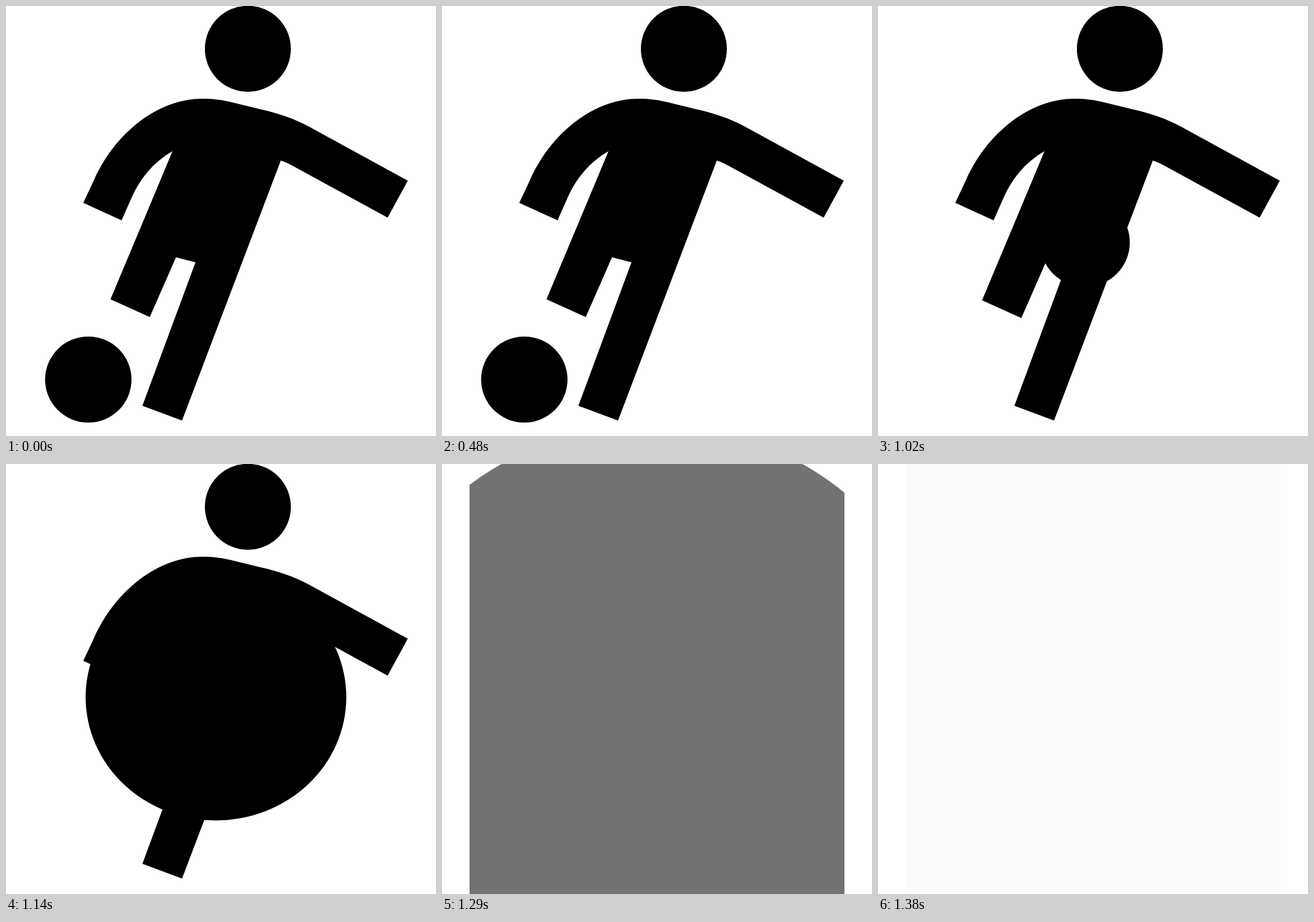
These frames come from a looping animation (640 by 640 pixels, 1830 ms). An HTML page with a canvas:

```html
<!DOCTYPE html>
<html lang="en">
<head>
<meta charset="utf-8">
<title>Kick</title>
<style>
  html, body { margin: 0; width: 100%; height: 100%; overflow: hidden; background: #fff; }
  canvas { display: block; width: 640px; height: 640px; }
</style>
</head>
<body>
<canvas id="stage" width="640" height="640"></canvas>
<script>
const ctx = document.getElementById('stage').getContext('2d');
const LOOP = 1830, STEP = 30, END = 1380;

const body = new Path2D(`
  M115 293 L131 259 C163 187 228 138 292 138 C310 138 322 140 335 143
  L380 154 C403 159 430 168 450 179 L598 260 L568 315
  L425 237 C420 234 415 232 409 230 L262 617 L203 595 L282 381.5 L253 374
  L190 356 L248 216 C220 232 200 256 188 283 L172 319 Z`);

const mix = (a, b, k) => a + (b - a) * k;

// Ease in and out between two times
function ease(t, from, to) {
  const u = Math.min(1, Math.max(0, (t - from) / (to - from)));
  return u * u * (3 - 2 * u);
}

function oval(x, y, rx, ry) {
  ctx.beginPath();
  ctx.ellipse(x, y, rx, ry, 0, 0, Math.PI * 2);
  ctx.fill();
}

function drawPlayer(t) {
  ctx.fillStyle = '#000';
  oval(360, 63.7, 64, 64);
  ctx.fill(body);

  // The kicking leg slides out along its own axis and back
  const reach = 70 * (ease(t, 550, 691) - ease(t, 691, 1053));
  const dx = -0.39 * reach, dy = 0.92 * reach;
  ctx.beginPath();
  ctx.moveTo(248, 216);
  ctx.lineTo(253, 374);
  ctx.lineTo(214, 463);
  ctx.lineTo(214 + dx, 463 + dy);
  ctx.lineTo(155.5 + dx, 436.5 + dy);
  ctx.closePath();
  ctx.fill();
}

function drawBall(t) {
  const fly = ease(t, 691, 1053);
  const grow = ease(t, 1003.5, 1378.5);
  const tone = Math.min(252, Math.round(255 * ease(t, 1203, 1390.5)));
  ctx.save();
  ctx.beginPath();
  ctx.rect(41, 0, 558, 640);
  ctx.clip();
  ctx.fillStyle = `rgb(${tone}, ${tone}, ${tone})`;
  oval(mix(122.5, 312.5, fly), mix(556, 347, fly), 64.3 * mix(1, 7.7, grow), 64 * mix(1, 7.2, grow));
  ctx.restore();
}

function frame() {
  const now = performance.now() % LOOP;
  const t = Math.min(END, Math.floor(now / STEP) * STEP);
  ctx.fillStyle = '#fff';
  ctx.fillRect(0, 0, 640, 640);
  drawPlayer(t);
  drawBall(t);
  requestAnimationFrame(frame);
}
frame();
</script>
</body>
</html>
```
